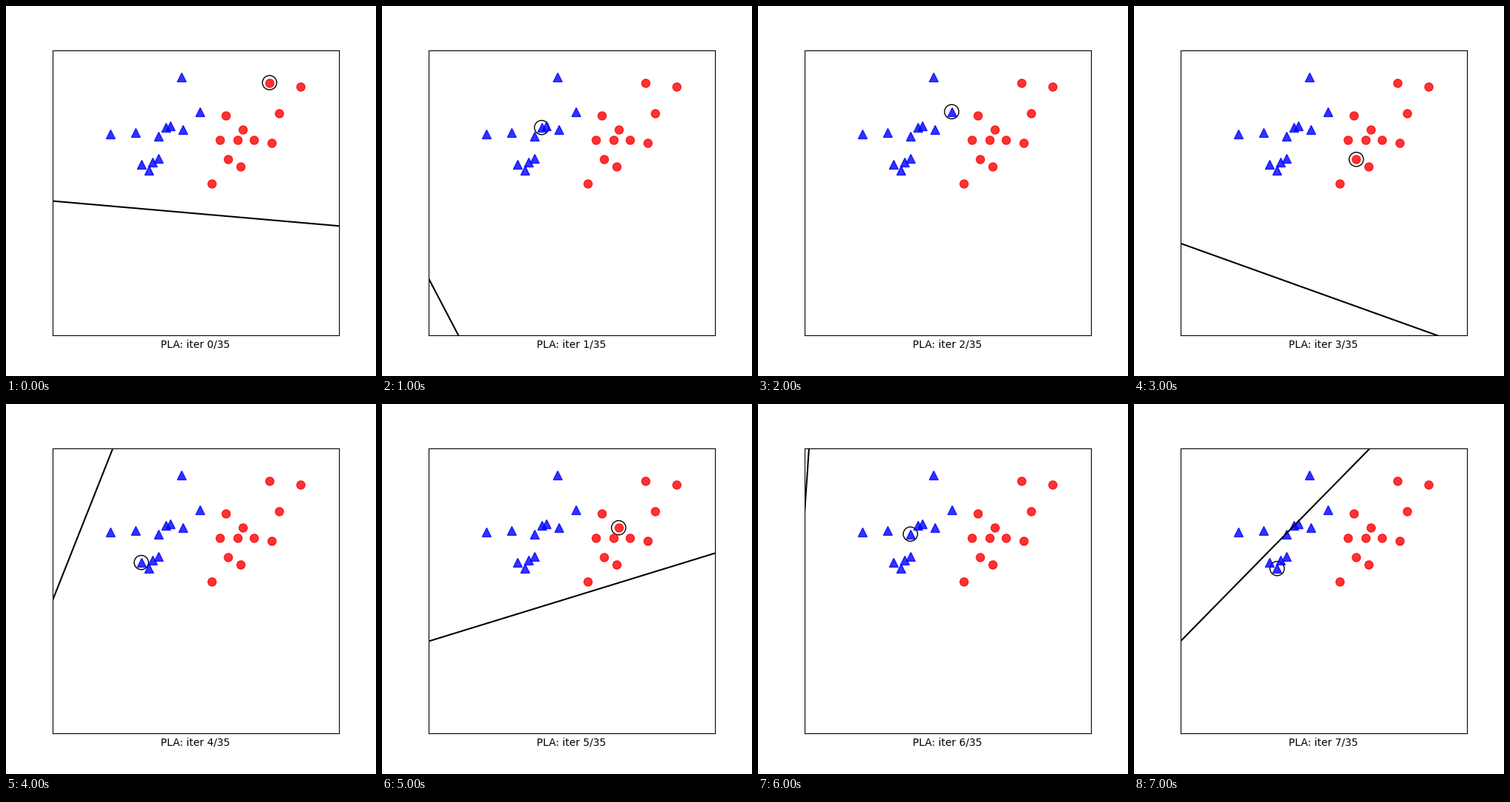
Recreate the animation shown at these times as a matplotlib script. Size 500 by 500 pixels, loop 8 s.

```python
import numpy as np
import matplotlib.pyplot as plt
from matplotlib.animation import FuncAnimation

TOTAL = 35
N = 12
rng = np.random.RandomState(2)


def cluster(cx, cy):
    """Gaussian cloud stretched along the diagonal."""
    z = rng.randn(N, 2)
    along, across = np.sqrt(0.25) * z[:, 0], np.sqrt(0.05) * z[:, 1]
    return np.column_stack([cx - along - across, cy - along + across])


blue = cluster(2, 2)
red = cluster(4, 2)
points = np.vstack([blue, red])
labels = np.repeat([1, -1], N)

# Perceptron: each misclassified point shifts the weights
picks = [21, 9, 2, 23, 7, 20, 0, 3]
weights = [rng.randn(3)]
for k in picks[:-1]:
    weights.append(weights[-1] + labels[k] * np.r_[1, points[k]])

fig, ax = plt.subplots(figsize=(5, 5), dpi=100)
ax.axis([0, 6, -2, 4])
ax.set_xticks([])
ax.set_yticks([])
ax.plot(*blue.T, "b^", markersize=8, alpha=0.8)
ax.plot(*red.T, "ro", markersize=8, alpha=0.8)
line, = ax.plot([], [], "k")
ring = plt.Circle((0, 0), 0.15, color="k", fill=False)
ax.add_artist(ring)
caption = ax.set_xlabel("")


def update(i):
    w0, w1, w2 = weights[i]
    x = np.array([-100, 100])
    line.set_data(x, -(w0 + w1 * x) / w2)
    ring.center = tuple(points[picks[i]])
    caption.set_text(f"PLA: iter {i}/{TOTAL}")
    return line, ring, caption


anim = FuncAnimation(fig, update, frames=len(picks), interval=1000,
                     repeat=True, repeat_delay=0)
plt.show()
```
